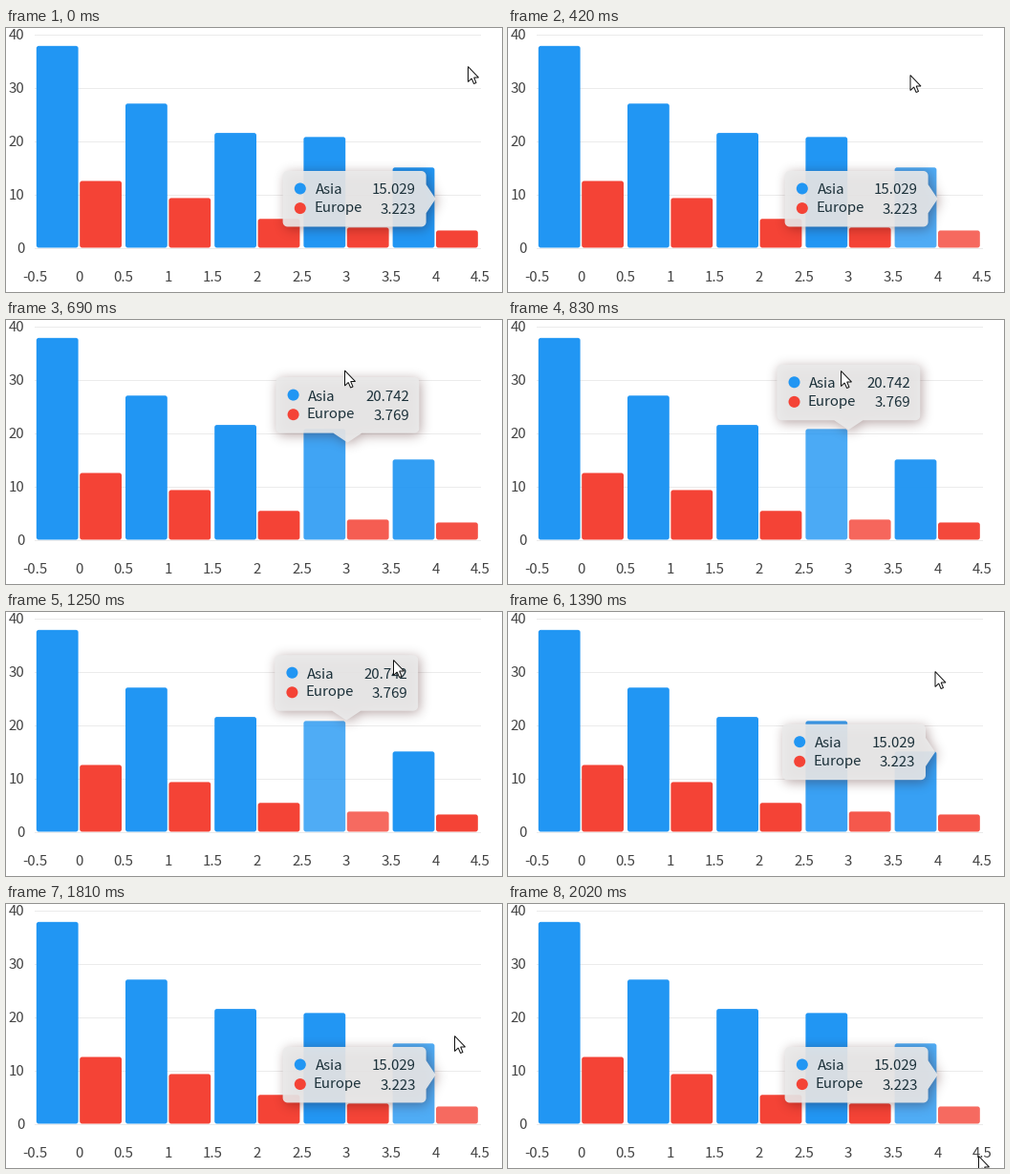
A matplotlib script that plays this animation: 519x277 px, repeating every 2090 ms.

```python
import numpy as np
import matplotlib.pyplot as plt
from matplotlib.animation import FuncAnimation
from matplotlib.patches import Circle, FancyBboxPatch, Polygon
from matplotlib.path import Path

W, H, DPI = 519, 277, 64
PX = 72 / DPI  # points per pixel
LOOP, TICK = 2090, 10
STARTS = np.array([70 * k - 10 * (k > 3) for k in range(30)])  # redraw times, ms

BLUE, RED = "#2196f3", "#f44336"
ASIA = [37.8, 27.0, 21.5, 20.742, 15.029]
EUROPE = [12.5, 9.3, 5.4, 3.769, 3.223]
LEFT, SLOT, BASE, UNIT = 30, 93.2, 230.5, 5.6

# Tooltip geometry and timing
TIP_W, TIP_H, WEDGE, RADIUS = 150, 58.5, 10, 5
PAD, SIGMA = 22, 6
TO_THREE, TO_FOUR = 569, 1317
HOME = {4: np.array([289.6, 150.0]), 3: np.array([281.2, 45.2])}

# Pointer path: redraw step, x, y
POINTER = np.array([
    (0, 483, 40), (1, 482, 40.5), (3, 468, 43), (5, 440, 47), (7, 401, 51),
    (8, 381, 52), (9, 362, 52), (10, 354, 52.5), (12, 348, 53), (14, 346, 53.5),
    (16, 362, 53), (17, 382, 51), (18, 405, 50), (19, 430, 55), (20, 446.5, 62),
    (21, 451, 66), (23, 453, 72), (24, 456.5, 82), (25, 461, 100),
    (26, 469, 138), (27, 479, 185), (28, 487, 228), (29, 492, 264)])
ARROW = np.array([(0.5, 0.5), (0.5, 16.5), (4.2, 13), (6.6, 18.5), (9, 17.5),
                  (6.7, 12), (11.5, 12)])

plt.rcParams["font.family"] = "Noto Sans CJK JP"
fig = plt.figure(figsize=(W / DPI, H / DPI), dpi=DPI, facecolor="white")
ax = fig.add_axes([0, 0, 1, 1])
ax.set_xlim(0, W)
ax.set_ylim(H, 0)
ax.axis("off")


def label(x, y, s, ha, color="#444444", z=1):
    return ax.text(x, y, s, ha=ha, va="baseline", color=color,
                   fontsize=15 * PX, zorder=z)


def bar(x, value, color):
    h = value * UNIT
    box = FancyBboxPatch((x, BASE - h), 43.8, h, fc=color, ec="none", zorder=2,
                         boxstyle="round,pad=0,rounding_size=2.5")
    return ax.add_patch(box)


def bubble(slot):
    """Rounded box with a wedge: right side for slot 4, bottom for slot 3."""
    def corner(cx, cy, start):
        a = np.radians(np.linspace(start, start + 90, 8))
        return list(zip(cx + RADIUS * np.cos(a), cy + RADIUS * np.sin(a)))

    r, half = RADIUS, 1.5 * WEDGE
    mx, my = TIP_W / 2, TIP_H / 2
    pts = corner(r, r, 180) + corner(TIP_W - r, r, 270)
    if slot == 4:
        pts += [(TIP_W, my - half), (TIP_W + WEDGE, my), (TIP_W, my + half)]
    pts += corner(TIP_W - r, TIP_H - r, 0)
    if slot == 3:
        pts += [(mx + half, TIP_H), (mx, TIP_H + WEDGE), (mx - half, TIP_H)]
    return np.array(pts + corner(r, TIP_H - r, 90))


def blurred(outline):
    w, h = TIP_W + 2 * PAD + WEDGE, int(TIP_H) + 2 * PAD + WEDGE
    yy, xx = np.mgrid[0:h, 0:w] + 0.5 - PAD
    inside = Path(outline).contains_points(np.c_[xx.ravel(), yy.ravel()])
    mask = inside.reshape(h, w).astype(float)
    d = np.arange(-18, 19)
    kernel = np.exp(-d ** 2 / (2 * SIGMA ** 2))
    kernel /= kernel.sum()
    for axis in (0, 1):
        mask = np.apply_along_axis(np.convolve, axis, mask, kernel, "same")
    rgba = np.zeros((h, w, 4))
    rgba[..., 0] = 50 / 255
    rgba[..., 3] = 0.35 * mask
    return rgba


def ease(t, half_life):
    return 1 - 2 ** (-max(t, 0) / half_life)


# Chart
for v in range(0, 41, 10):
    y = BASE - v * UNIT
    ax.plot([LEFT, 496], [y, y], color="#ebebeb", lw=PX, zorder=0)
    label(19.5, y + 6, str(v), "right")
for i in range(11):
    label(LEFT + i * SLOT / 2, 266.5, f"{i / 2 - 0.5:g}", "center")
bars = [(bar(LEFT + i * SLOT + 1.8, a, BLUE), bar(LEFT + i * SLOT + 47.2, e, RED))
        for i, (a, e) in enumerate(zip(ASIA, EUROPE))]

# Tooltip
OUTLINE = {s: bubble(s) for s in HOME}
SHADOW = {s: blurred(OUTLINE[s]) for s in HOME}
shadow = ax.imshow(SHADOW[4], aspect="auto", interpolation="bilinear", zorder=3)
ax.set_xlim(0, W)
ax.set_ylim(H, 0)
box = ax.add_patch(Polygon(OUTLINE[4], fc=(0.92, 0.92, 0.92, 0.9), ec="none", zorder=4))
INK = "#1c313a"
parts = [(label(0, 0, s, ha, INK, 5), np.array(off)) for s, ha, off in (
    ("Asia", "left", (34, 24.5)), ("Europe", "left", (32.4, 43)),
    ("", "right", (139.4, 24.5)), ("", "right", (139.4, 44.7)))]
dots = [(ax.add_patch(Circle((0, 0), 6, fc=c, ec="none", zorder=5)), np.array(off))
        for c, off in ((BLUE, (18.2, 18.5)), (RED, (18.2, 39.1)))]

pointer = ax.add_patch(Polygon(ARROW, fc="white", ec="#111111", lw=PX,
                               joinstyle="miter", zorder=6))


def fade(slot, amount):
    for patch in bars[slot]:
        patch.set_alpha(1 - 0.21 * amount)


def draw(i):
    step = np.searchsorted(STARTS, i * TICK, side="right") - 1
    t = STARTS[step]

    slot = 3 if TO_THREE <= t < TO_FOUR else 4
    pos = HOME[4]
    for start, goal in ((TO_THREE, 3), (TO_FOUR, 4)):
        if t >= start:
            pos = HOME[7 - goal] + (HOME[goal] - HOME[7 - goal]) * ease(t - start, 43)
    x, y = pos

    box.set_xy(OUTLINE[slot] + pos)
    h, w = SHADOW[slot].shape[:2]
    sx, sy = x - PAD + 2, y - PAD + 2
    shadow.set_data(SHADOW[slot])
    shadow.set_extent((sx, sx + w, sy + h, sy))
    parts[2][0].set_text(f"{ASIA[slot]:.3f}")
    parts[3][0].set_text(f"{EUROPE[slot]:.3f}")
    for text, off in parts:
        text.set_position(pos + off)
    for dot, off in dots:
        dot.center = tuple(pos + off)

    first, second, third = (ease(t - s, 80) for s in (30, TO_THREE, TO_FOUR))
    fade(4, third if t >= TO_FOUR else first * (1 - second))
    fade(3, second * (1 - third))

    steps, px, py = POINTER.T
    pointer.set_xy(ARROW + (np.interp(step, steps, px), np.interp(step, steps, py)))
    return []


anim = FuncAnimation(fig, draw, frames=LOOP // TICK, interval=TICK,
                     init_func=lambda: draw(0), repeat=True, repeat_delay=0)
plt.show()
```
